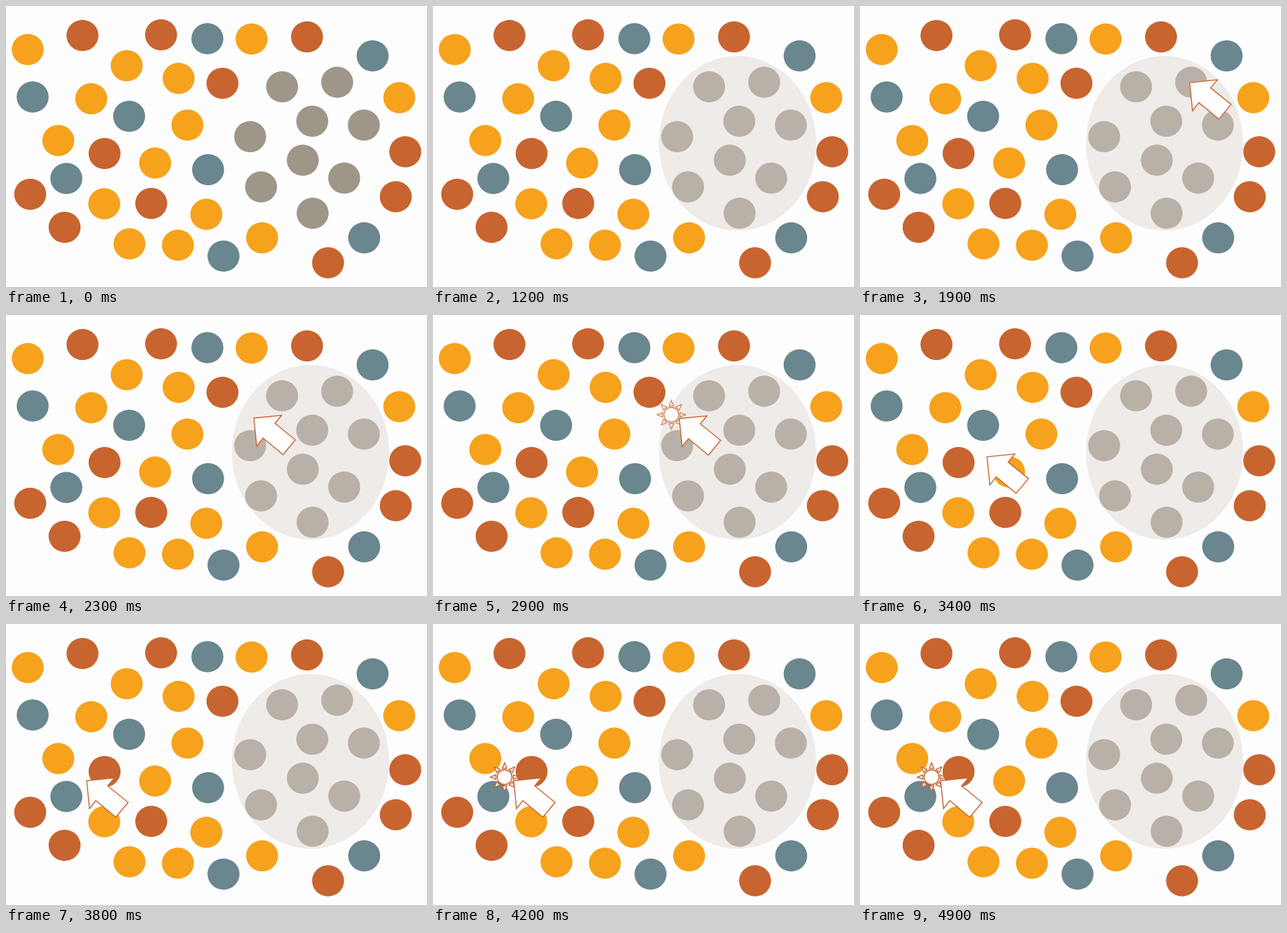
These frames come from a looping animation (600x400 px, 5 s). An HTML page with a canvas:

```html
<!DOCTYPE html>
<html lang="en">
<head>
<meta charset="utf-8">
<style>
  html, body { margin: 0; width: 100%; height: 100%; overflow: hidden; background: #fdfdfe; }
  canvas { display: block; }
</style>
</head>
<body>
<canvas id="stage" width="600" height="400"></canvas>
<script>
const ctx = document.getElementById('stage').getContext('2d');
const LOOP = 5000, STEP = 100, RUST = '#c8642f';

const dots = {
  '#f6a21c': [[31, 62], [172, 85], [246, 103], [350, 47], [121.5, 132], [258.5, 169.5], [74.5, 191.5],
              [212.5, 223.5], [140, 281.5], [285.5, 296.5], [176, 338.5], [245, 340.5], [365, 330], [560.5, 130.5]],
  [RUST]: [[109, 42], [221, 41], [429, 44], [308.5, 110], [140.5, 210], [207, 281], [34.5, 268],
           [83.5, 315], [569, 207.5], [555.5, 271.5], [459, 365.5]],
  '#6a868f': [[287, 46.5], [522.5, 71], [38, 129.5], [175.5, 157], [86, 245.5], [288, 233], [310, 356], [510.5, 330]],
  '#9f968a': [[393.5, 115], [472, 108.5], [436.5, 164], [510, 169.5], [348, 186], [423, 219.5],
              [482, 245], [363.5, 257.5], [437, 295]]
};
const arrow = [[0, 0], [39.5, -4], [30, 7.5], [59, 31], [41.5, 52], [13, 28.5], [4, 40]];
const stops = [[495, 101], [351, 147.5], [115, 223]];

const ramp = (t, from, to) => Math.min(1, Math.max(0, (t - from) / (to - from)));
const ease = u => (1 - Math.cos(Math.PI * u)) / 2;

function ellipse(x, y, rx, ry) {
  ctx.beginPath();
  ctx.ellipse(x, y, rx, ry, 0, 0, 2 * Math.PI);
}

function outline() {
  ctx.fill();
  ctx.stroke();
}

function polygon(points) {
  ctx.beginPath();
  points.forEach(([x, y]) => ctx.lineTo(x, y));
  ctx.closePath();
  outline();
}

function drawSun(x, y, alpha) {
  ctx.save();
  ctx.globalAlpha = alpha;
  ctx.translate(x, y);
  ellipse(0, 0, 10.5, 10.5);
  outline();
  for (let i = 0; i < 8; i++) {
    polygon([[-3.2, -12.5], [0, -20.3], [3.2, -12.5]]);
    ctx.rotate(Math.PI / 4);
  }
  ctx.restore();
}

function drawArrow(t) {
  const first = ease(ramp(t, 1730, 2350)), second = ease(ramp(t, 3000, 3620));
  const [x, y] = [0, 1].map(k => stops[0][k]
    + (stops[1][k] - stops[0][k]) * first
    + (stops[2][k] - stops[1][k]) * second);
  ctx.save();
  ctx.translate(x, y);
  polygon(arrow);
  ctx.restore();
}

function draw(t) {
  ctx.fillStyle = '#fdfdfe';
  ctx.fillRect(0, 0, 600, 400);
  for (const color in dots) {
    ctx.fillStyle = color;
    for (const [x, y] of dots[color]) {
      ellipse(x, y, 22.8, 22.2);
      ctx.fill();
    }
  }

  ctx.globalAlpha = 0.43 * ramp(t, 700, 1200);
  ctx.fillStyle = 'rgb(217,210,203)';
  ellipse(434, 195.5, 112, 124.5);
  ctx.fill();
  ctx.globalAlpha = 1;

  if (t < 1800) return;
  ctx.fillStyle = '#fff';
  ctx.strokeStyle = RUST;
  ctx.lineWidth = 1.4;
  drawSun(339.7, 142, ramp(t, 2400, 2700) * (1 - ramp(t, 2850, 3050)));
  drawSun(102, 218, ramp(t, 3850, 4150));
  drawArrow(t);
}

function tick() {
  const t = performance.now() % LOOP;
  draw(Math.floor(t / STEP) * STEP);
  requestAnimationFrame(tick);
}
tick();
</script>
</body>
</html>
```
